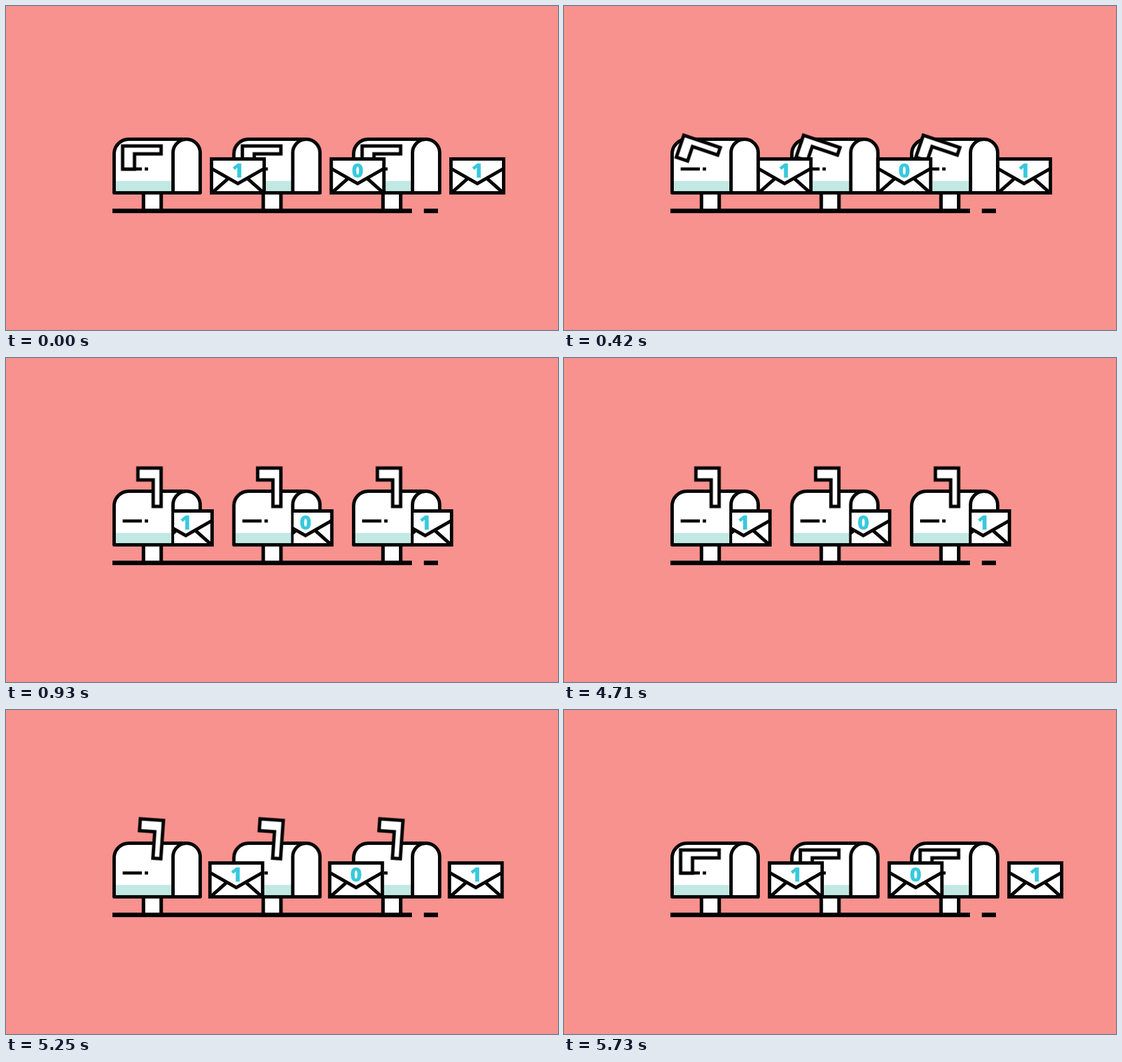
Animation, 975 px wide and 574 px high, one loop 9480 ms. Source, as an HTML page:

```html
<!DOCTYPE html>
<html lang="en">
<head>
<meta charset="utf-8">
<title>Mailboxes</title>
<style>
  html, body { margin: 0; width: 100%; height: 100%; overflow: hidden; background: #f8928e; }
  svg { display: block; width: 975px; height: 574px; }
  .ink { fill: #fff; stroke: #050505; stroke-width: 6; }
  .line { fill: none; }
  .digit { fill: #38c9dd; font: 800 36px "Open Sans", "Noto Sans", sans-serif; text-anchor: middle; }
</style>
</head>
<body>
<svg viewBox="0 0 975 574">
  <defs>
    <clipPath id="opening"><rect x="297" y="200" width="400" height="200"/></clipPath>
    <g id="box" class="ink">
      <path d="M243 332V362M274 332V362" stroke-width="6.5"/>
      <path d="M246 332H271V360H246Z" stroke="none"/>
      <path d="M191 331V262A26 26 0 0 1 217 236H319A24 24 0 0 1 343 260V331Z" stroke-linejoin="round"/>
      <path d="M194 310H292V328H194Z" fill="#c2e8e4" stroke="none"/>
      <path class="line" d="M295 331V260A24 24 0 0 1 319 236"/>
      <path class="line" d="M206 288.7H240M245 288.7H251" stroke-width="5.5"/>
    </g>
    <path id="flag" class="ink" d="M-33.5 -60.5H7.5V7.5H-6.5V-39.5H-33.5Z"/>
    <g id="envelope" class="ink">
      <path d="M363 271H456V331H363Z"/>
      <path class="line" d="M365 330L392 306M454 330L427 306M363 288L409.5 314.5L456 288"/>
    </g>
  </defs>
  <g id="boxes"></g>
  <path d="M188 363H717M738 363H763" stroke="#000" stroke-width="8"/>
  <g id="letters"></g>
</svg>
<script>
const LOOP = 9480, STEP = 30;
const SPACING = 211.5, TRAVEL = 92;

// Ease in-out with anticipation and overshoot
function backInOut(t) {
  const c = 2.5949, half = u => u * u * ((c + 1) * u - c) / 2;
  if (t <= 0) return 0;
  if (t >= 1) return 1;
  return t < 0.5 ? half(2 * t) : 1 - half(2 - 2 * t);
}

const move = (time, start, duration) => backInOut((time - start) / duration);

const letterIn = t => move(t, 25, 900) - move(t, 4688, 900);
const flagUp = t => move(t, 27, 900) - move(t, 5190, 540);

function play(element, pose) {
  const count = LOOP / STEP;
  const frames = Array.from({ length: count + 1 }, (_, i) => ({
    offset: i / count,
    transform: pose(i * STEP),
    easing: 'step-end'
  }));
  element.animate(frames, { duration: LOOP, iterations: Infinity, delay: -1 });
}

const boxes = document.getElementById('boxes');
const letters = document.getElementById('letters');

['1', '0', '1'].forEach((digit, i) => {
  const shift = `translate(${i * SPACING} 0)`;
  boxes.insertAdjacentHTML('beforeend', `
    <g transform="${shift}">
      <use href="#box"/>
      <g transform="translate(266.5 255.5)"><g class="flag"><use href="#flag"/></g></g>
    </g>`);
  letters.insertAdjacentHTML('beforeend', `
    <g transform="${shift}" clip-path="url(#opening)">
      <g class="letter">
        <use href="#envelope"/>
        <text class="digit" x="409.5" y="303.5">${digit}</text>
      </g>
    </g>`);
});

document.querySelectorAll('.flag').forEach(el =>
  play(el, t => `rotate(${90 * (flagUp(t) - 1)}deg)`));
document.querySelectorAll('.letter').forEach(el =>
  play(el, t => `translate(${-TRAVEL * letterIn(t)}px, 0px)`));
</script>
</body>
</html>
```
